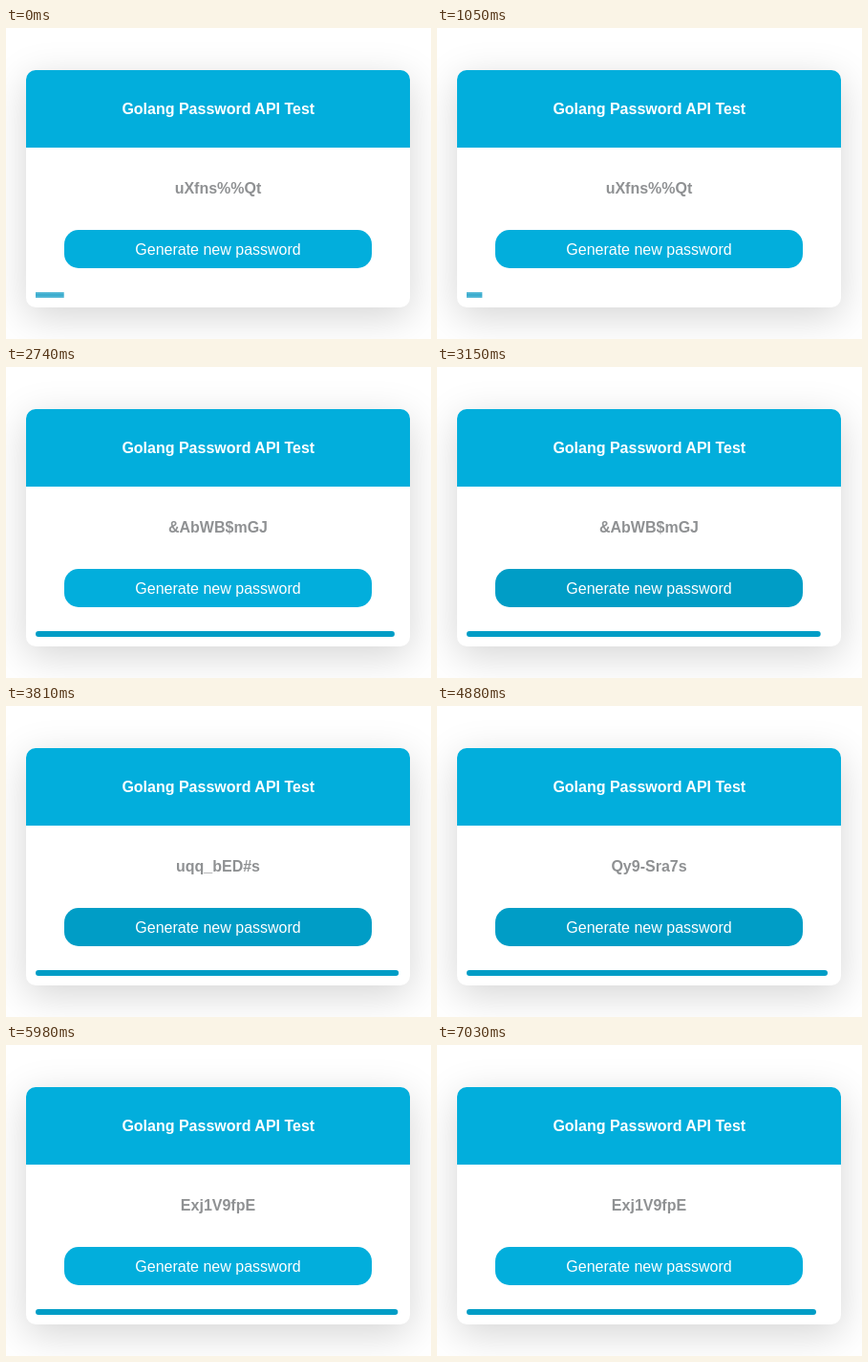
Recreate the animation shown at these times as an HTML page. Size 445 by 325 pixels, loop 7.06 s.

```html
<!DOCTYPE html>
<html lang="en">
<head>
<meta charset="utf-8">
<title>Password generator</title>
<style>
  html, body { margin: 0; width: 100%; height: 100%; overflow: hidden; background: #fff; }
  .card {
    position: absolute; left: 21px; top: 44px; width: 402px; height: 248px;
    border-radius: 10px; background: #fff;
    box-shadow: 0 10px 40px rgba(0, 0, 0, .17);
  }
  svg { position: absolute; left: 0; top: 0; }
  text { font: 16px "Liberation Sans", Arial, sans-serif; text-anchor: middle; fill: #fff; }
  .bold { font-weight: bold; }
  #password { fill: #8f9193; }
</style>
</head>
<body>
<div class="card"></div>
<svg width="445" height="325" viewBox="0 0 445 325">
  <defs>
    <linearGradient id="fading" x1="0" y1="0" x2="0" y2="1">
      <stop offset="0" stop-color="#62bfda"/>
      <stop offset=".5" stop-color="#35a9cc"/>
      <stop offset="1" stop-color="#62bfda"/>
    </linearGradient>
  </defs>
  <path d="M21 125V54a10 10 0 0 1 10-10H413a10 10 0 0 1 10 10V125Z" fill="#02aedc"/>
  <text class="bold" x="222.3" y="90">Golang Password API Test</text>
  <text class="bold" id="password" x="222" y="173"></text>
  <rect id="button" x="61" y="211" width="322" height="40" rx="15"/>
  <text x="222" y="237">Generate new password</text>
  <rect id="bar" x="31" y="276" height="6"/>
</svg>
<script>
  const LOOP = 7060;
  const FULL = 381;          // bar width right after a new password
  const LIFETIME = 30000;    // time until the bar runs out
  const HOVER = [2800, 5920];

  // start time of each password; the first is already near its end
  const passwords = [
    [2340 - LIFETIME, "uXfns%%Qt"],
    [2340, "&AbWB$mGJ"],
    [3745, "uqq_bED#s"],
    [4200, "mK4_tRw8b"],
    [4645, "Qy9-Sra7s"],
    [5850, "Exj1V9fpE"]
  ];

  const byId = id => document.getElementById(id);
  const label = byId("password"), button = byId("button"), bar = byId("bar");

  function draw(t) {
    const [start, word] = passwords.findLast(p => p[0] <= t);
    const fading = start < 0;
    const hover = t >= HOVER[0] && t < HOVER[1];

    if (label.textContent !== word) label.textContent = word;
    button.setAttribute("fill", hover ? "#009dc6" : "#02aedc");
    bar.setAttribute("width", FULL * (1 - (t - start) / LIFETIME));
    bar.setAttribute("rx", fading ? 0 : 3);
    bar.setAttribute("fill", fading ? "url(#fading)" : "#009dc6");
  }

  const begin = performance.now();
  function tick() {
    draw((performance.now() - begin) % LOOP);
    requestAnimationFrame(tick);
  }
  tick();
</script>
</body>
</html>
```
